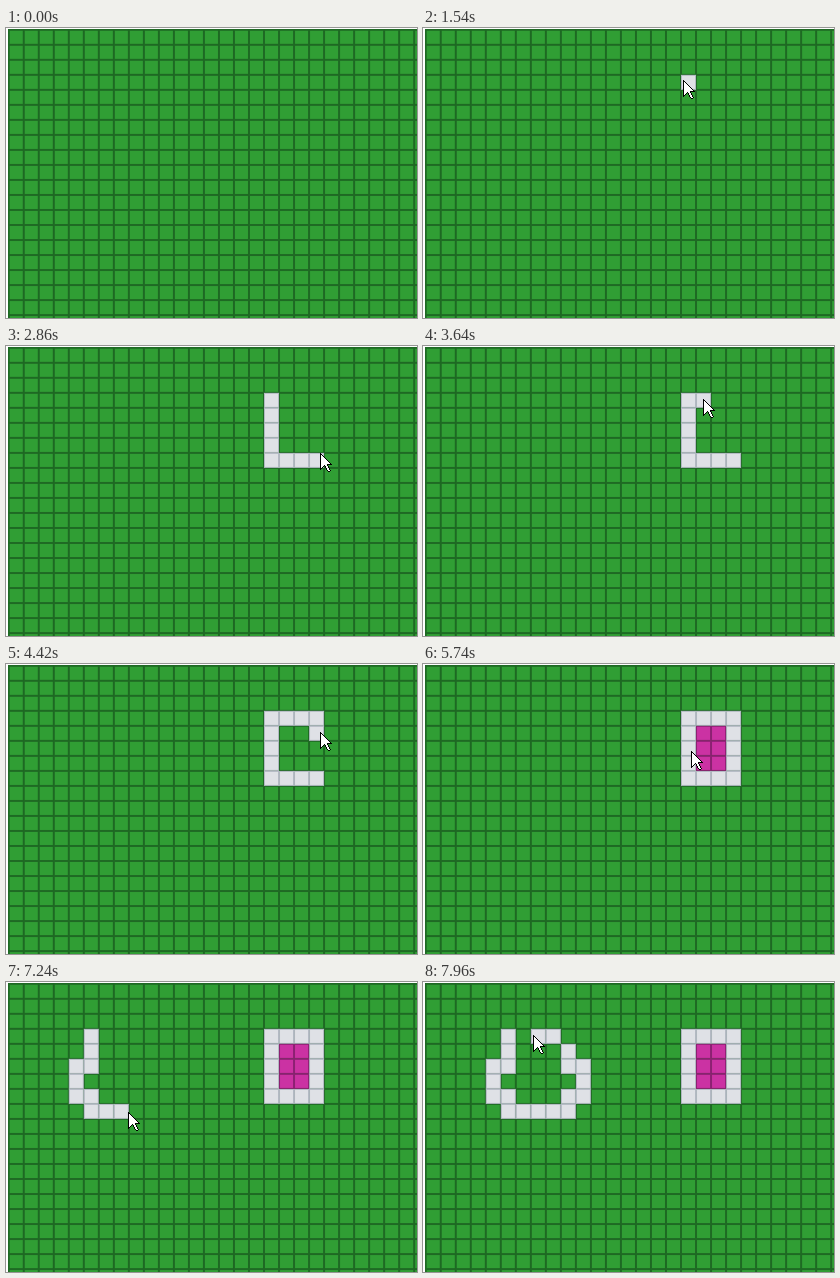
An HTML page with a canvas for the animation above (8 s loop, 411 px wide and 290 px high).

```html
<!DOCTYPE html>
<html lang="en">
<head>
<meta charset="utf-8">
<title>Grid painting</title>
<style>
html, body { margin: 0; width: 100%; height: 100%; overflow: hidden; background: #fff; }
canvas { display: block; width: 100vw; height: 100vh; }
</style>
</head>
<body>
<canvas id="stage" width="411" height="290"></canvas>
<script>
const ctx = document.getElementById('stage').getContext('2d');
const W = 411, H = 290, LOOP = 8000, STEP = 60, PHASE = 40;
const CELL = 15.015, LEFT = 2.75, TOP = 1.8;
const GREEN = { fill: '#309e34', edge: '#1f6a24' };
const WHITE = { fill: '#dfe1e6', edge: '#b2b8c2' };
const PINK = { fill: '#cb32a3', edge: '#8f2074' };
const CURSOR_AT = 100, FILL_AT = 5260, RING_AT = 6700;

// Each move: start, end, then the values reached; the pointer rests in between
const START = [368, 63];
const moves = [
  [760, 1180, 182, 100], [1180, 1540, 260, 52],
  [1600, 2080, 266, 107], [2080, 2200, 275, 107], [2440, 2860, 314, 107],
  [2860, 3280, 266, 50], [3460, 4060, 314, 60],
  [4360, 4660, 314, 101], [4660, 4900, 302, 95],
  [5020, 5260, 290, 88], [5680, 5740, 268, 87],
  [5860, 6580, 86, 52], [6580, RING_AT, 85.5, 69.7]
];
const turns = [[RING_AT, 7240, 279], [7240, 7540, 380], [7540, 7960, 457]];
// Times with the button held down
const strokes = [[1540, 2860], [3520, 4660], [6580, 7960]];

function follow(start, legs, t) {
  let at = start;
  for (const [from, to, ...goal] of legs) {
    if (t <= from) break;
    const u = Math.min(1, (t - from) / (to - from));
    at = at.map((v, i) => v + (goal[i] - v) * u);
  }
  return at;
}

// Egg-shaped loop: a half ellipse below, a narrower dome above
function ring(deg) {
  const a = deg * Math.PI / 180, s = Math.sin(a);
  const y = s > 0 ? 98 - 45.25 * s ** 1.5 : 98 - 32 * s;
  return [115.5 + 44 * Math.cos(a), y];
}

function pointer(t) {
  return t < RING_AT ? follow(START, moves, t) : ring(follow([133], turns, t)[0]);
}

function drawCell(col, row, { fill, edge }) {
  const x = LEFT + col * CELL, y = TOP + row * CELL;
  ctx.fillStyle = edge;
  ctx.fillRect(x, y, CELL, CELL);
  ctx.fillStyle = fill;
  ctx.fillRect(x + 1, y + 1, CELL - 2, CELL - 2);
}

function drawBlock(col, row, cols, rows, color) {
  for (let r = row; r < row + rows; r++)
    for (let c = col; c < col + cols; c++) drawCell(c, r, color);
}

function drawGrid() {
  ctx.fillStyle = '#fff';
  ctx.fillRect(0, 0, W, H);
  ctx.fillStyle = GREEN.edge;
  ctx.fillRect(2, 1, W, H);
  drawBlock(0, 0, 28, 20, GREEN);
}

function drawStrokes(now) {
  const painted = new Set();
  for (const [from, to] of strokes)
    for (let t = from; t <= Math.min(to, now); t += 10) {
      const [x, y] = pointer(t);
      const col = Math.floor((x - LEFT) / CELL), row = Math.floor((y - TOP) / CELL);
      const key = col + ',' + row;
      if (!painted.has(key)) drawCell(col, row, WHITE);
      painted.add(key);
    }
}

function drawCursor(t) {
  const [px, py] = pointer(t).map(Math.round);
  const run = (color, x, y, w) => {
    ctx.fillStyle = color;
    ctx.fillRect(px + x, py + y, w, 1);
  };
  const span = (x, y, w) => {
    run('#000', x, y, w);
    if (w > 2) run('#fff', x + 1, y, w - 2);
  };
  for (let y = 0; y < 12; y++) span(0, y, y + 1);
  run('#000', 7, 11, 5);
  for (let y = 12; y < 17; y++) span(0, y, 17 - y);
  for (let y = 12; y < 18; y++) span(4 + ((y - 11) >> 1), y, 4);
  span(8, 18, 2);
}

function frame() {
  const time = performance.now() % LOOP;
  const t = PHASE + STEP * Math.floor((time - PHASE) / STEP);
  drawGrid();
  drawStrokes(t);
  if (t >= FILL_AT) drawBlock(18, 4, 2, 3, PINK);
  if (t >= CURSOR_AT) drawCursor(t);
  requestAnimationFrame(frame);
}
frame();
</script>
</body>
</html>
```
